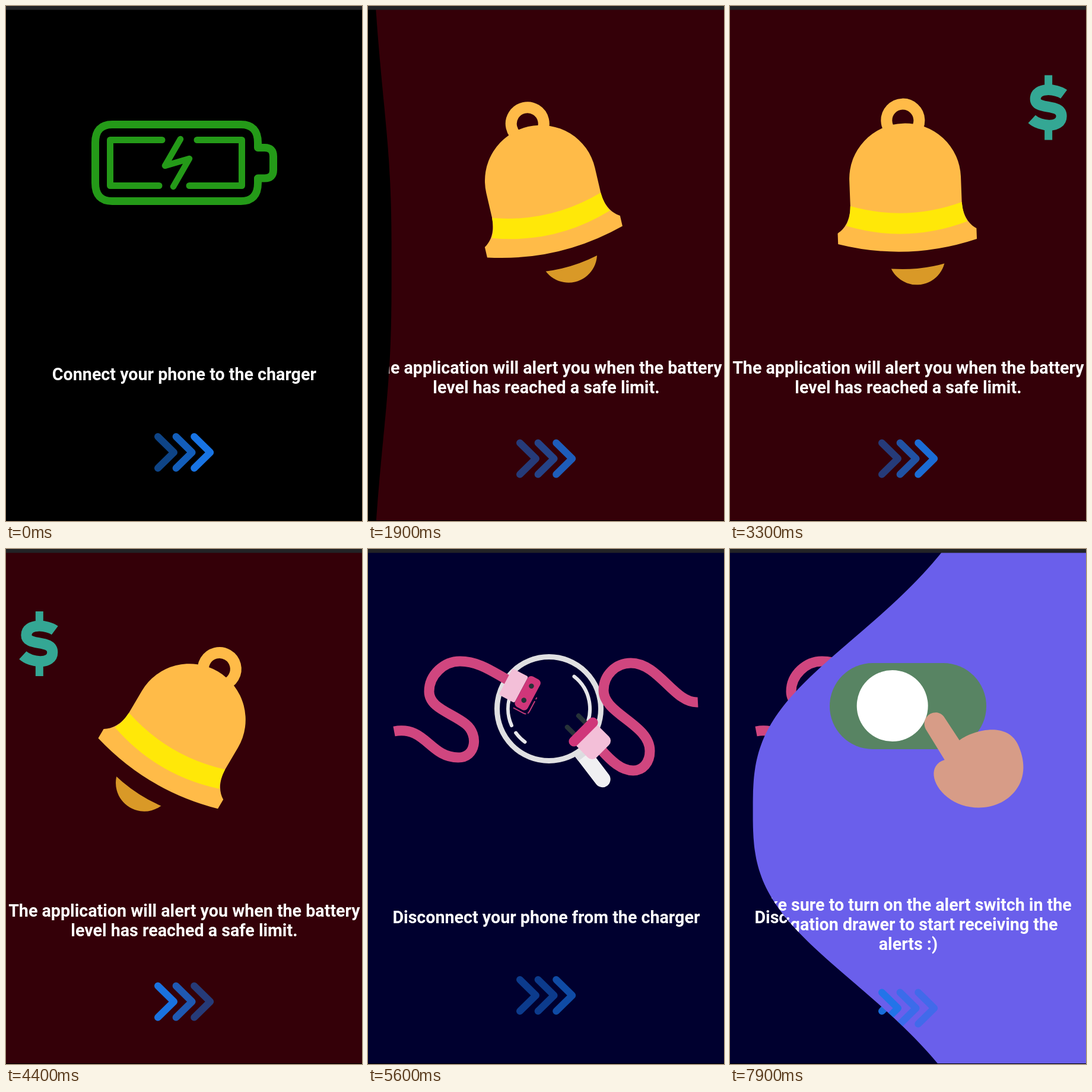
Write an HTML page that moves like this. It is 600x867 px and loops after 8 s.

```html
<!DOCTYPE html>
<html lang="en">
<head>
<meta charset="utf-8">
<title>Battery alert onboarding</title>
<style>
html, body { margin: 0; width: 100%; height: 100%; overflow: hidden; background: #000; }
svg { display: block; width: 600px; height: 867px; }
text { font: 700 28.65px Roboto, "Liberation Sans", sans-serif; fill: #fff; text-anchor: middle; }
.line { fill: none; stroke-linecap: round; stroke-linejoin: round; }
</style>
</head>
<body>
<svg viewBox="0 0 600 867">
  <defs>
    <clipPath id="wave"><path id="wavePath"/></clipPath>
    <clipPath id="belowBell"><path d="M-203 60Q-13.5 197 176 60V240H-203Z"/></clipPath>
  </defs>

  <g class="page" data-chevron="751.5">
    <rect width="600" height="867"/>
    <g class="line" stroke="#249a18">
      <path stroke-width="13" d="M424.5 238.5V230Q424.5 199.5 396 199.5H179Q150.5 199.5 150.5 230V298Q150.5 328.5 179 328.5H396Q424.5 328.5 424.5 298V290H436Q450.5 290 450.5 276V253Q450.5 238.5 436 238.5Z" />
      <path stroke="#000" stroke-width="15" stroke-linecap="butt" d="M424.5 246V282"/>
      <path stroke-width="11" d="M263 225.5H175.5V302.5H258M322 225.5H397.5V302.5H309"/>
      <path stroke-width="10.5" d="M294 224L268 269L309 257L282 304"/>
    </g>
    <text y="630" x="300.4">Connect your phone to the charger</text>
  </g>

  <g class="page" data-chevron="762">
    <rect width="600" height="867" fill="#340008"/>
    <g id="dollar" fill="none" stroke="#34a794">
      <path stroke-width="18" d="M27 -22C15 -31 -21 -35 -21 -14C-21 6 23 -8 23 15C23 36 -13 33 -27 20"/>
      <path stroke-width="13" d="M1 -54V-34M1 34V55"/>
    </g>
    <g id="bell">
      <g clip-path="url(#belowBell)"><circle id="clapper" cy="107.5" r="48" fill="#d99927"/></g>
      <g transform="translate(-13.5)" fill="#ffbb48">
        <circle cy="-122" r="27.5" fill="none" stroke="#ffbb48" stroke-width="19"/>
        <path d="M-94 -24A94 93 0 0 1 94 -24V19C95 43 105 57 117 64V82Q0 116 -117 82V64C-105 57 -95 43 -94 19Z"/>
        <path fill="#ffe808" d="M-94 19Q0 49 94 19Q95 40 102 52Q0 86 -102 52Q-95 40 -94 19Z"/>
      </g>
    </g>
    <text y="619" x="300.4">The application will alert you when the battery</text>
    <text y="652" x="300.4">level has reached a safe limit.</text>
  </g>

  <g class="page" data-chevron="751.5">
    <rect width="600" height="867" fill="#00002f"/>
    <g id="lens">
      <g id="handle">
        <path d="M90 -13H149A13.5 13.5 0 0 1 149 14H90Z" fill="#f0f0f2"/>
        <path d="M90 -13H100V14H90Z" fill="#dcdce0"/>
      </g>
      <circle r="87.5" fill="none" stroke="#e0e0e2" stroke-width="9"/>
      <g id="glints" class="line" stroke="#e6e6ea" stroke-width="6"></g>
    </g>
    <g class="line" stroke="#d0467f" stroke-width="17" style="stroke-linecap:butt">
      <path d="M44 307C97 297 104 351 152 351C182 351 187 313 165 295C142 276 103 268 103 240C103 212 128 189 155 189C188 189 212 208 240 223"/>
      <path id="rightCord"/>
    </g>
    <g id="socket">
      <rect id="socketBody" y="-25" height="50" rx="3" fill="#f3bfd8"/>
      <rect id="socketHead" y="-29" height="58" rx="7" fill="#d0367a"/>
      <circle class="hole" cy="-13.5" r="4.3" fill="#263238"/>
      <circle class="hole" cy="13.5" r="4.3" fill="#263238"/>
      <path id="socketEdge" class="line" stroke="#c03a78" stroke-width="2" stroke-dasharray="22 5"/>
    </g>
    <g id="plug">
      <path class="line" stroke="#263238" stroke-width="8" d="M-13.5 0V-25M13.5 0V-25"/>
      <rect x="-25" y="0" width="50" height="46" rx="10" fill="#f3bfd8"/>
      <rect x="-31" y="-8.5" width="62" height="17" rx="8" fill="#d0367a"/>
    </g>
    <text y="630" x="300.4">Disconnect your phone from the charger</text>
  </g>

  <g class="page" data-chevron="773">
    <rect width="600" height="867" fill="#6a5feb"/>
    <rect x="168" y="192" width="264" height="145" rx="72.5" fill="#588463"/>
    <g id="toggle">
      <circle cx="274" cy="264" r="60" fill="#fff"/>
      <path fill="#d79c87" d="M330 303C320 280 350 265 362 284L387 322C410 305 466 290 485 328C498 355 499 384 482 406C454 443 398 443 367 418C339 396 335 363 362 355Z"/>
    </g>
    <text y="609" x="300.4">Make sure to turn on the alert switch in the</text>
    <text y="642" x="300.4">navigation drawer to start receiving the</text>
    <text y="675" x="300.4">alerts :)</text>
  </g>

  <rect width="600" height="6.5" fill="#232326"/>
  <rect y="866" width="600" height="1"/>
</svg>
<script>
const LOOP = 8000, SWIPE = 1000, CHEVRON_PERIOD = 1500, SWING_PERIOD = 1488;
const swipeStarts = [null, 965, 4550, 7500];
const chevronPhases = [0.33, 0.187, 0.803, 0.783];
const $ = id => document.getElementById(id);
const set = (el, attrs) => { for (const k in attrs) el.setAttribute(k, attrs[k]); };
const make = (parent, name, attrs) => {
  const el = document.createElementNS("http://www.w3.org/2000/svg", name);
  set(el, attrs);
  return parent.appendChild(el);
};
const clamp = v => Math.min(1, Math.max(0, v));
const mix = (a, b, u) => a + (b - a) * u;
const rad = deg => deg * Math.PI / 180;

const pages = [...document.querySelectorAll(".page")];
const chevrons = pages.map(page => [0, 1, 2].map(i => make(page, "path", {
  class: "line", stroke: "#1977ea", "stroke-width": 12,
  d: `M${256 + i * 30.6} ${page.dataset.chevron - 26.5}l27 26.5l-27 26.5`
})));

const glintPoint = deg => `${69 * Math.cos(rad(deg))} ${69 * Math.sin(rad(deg))}`;
for (const [from, to] of [[-52, 37], [156, 203], [126, 144]])
  make($("glints"), "path", { d: `M${glintPoint(from)}A69 69 0 0 1 ${glintPoint(to)}` });

// Right-hand region whose left edge bulges, overshoots and settles.
function wavePath(p) {
  const grow = clamp(p / 0.4), settle = (p - 0.4) / 0.6;
  const side = p < 0.4 ? 57 * grow : mix(57, 602, clamp(settle / 0.8));
  const bulge = p < 0.4 ? 505 * grow
    : 505 * Math.exp(-2.04 * settle) * Math.cos(4.676 * settle);
  const reach = 0.465 * mix(82, 780, grow);
  let d = "M1200 0";
  for (let y = 0; y <= 870; y += 6) {
    const depth = 1 / (1 + (Math.abs(y - 440) / reach) ** 3);
    d += `L${(600 - side - bulge * depth).toFixed(1)} ${y}`;
  }
  return d + "L1200 870Z";
}

function drawPages(t) {
  pages.forEach((page, i) => {
    const p = i ? (t - swipeStarts[i]) / SWIPE : 1;
    page.style.display = p > 0 ? "" : "none";
    if (p > 0 && p < 1) {
      set($("wavePath"), { d: wavePath(p) });
      set(page, { "clip-path": "url(#wave)" });
    } else page.removeAttribute("clip-path");

    // Each arrow lights up quickly and fades a little slower.
    const phase = (t / CHEVRON_PERIOD + chevronPhases[i]) % 1;
    chevrons[i].forEach((el, k) => {
      const gap = phase - 0.1 - 0.12 * k;
      const glow = clamp(gap < 0 ? 1 + gap / 0.2 : 1 - gap / 0.27);
      set(el, { "stroke-opacity": 0.5 + 0.5 * glow });
    });
  });
}

function drawBell(t) {
  const a = 2 * Math.PI * (t - 4400) / SWING_PERIOD;
  set($("bell"), { transform: `translate(309.5 314) rotate(${30.5 * Math.cos(a)})` });
  set($("clapper"), { cx: -13.5 - 12 * Math.cos(a) + 14 * Math.sin(a) });

  const since = t - 2950, flight = Math.floor(since / 1100);
  const k = (since - flight * 1100) / 350;
  const x = flight % 2 ? 300 - 244 * k : 300 + 235 * k;
  const y = (flight % 2 ? 159.5 : 171) + 200 * (1 - k);
  $("dollar").style.display = since >= 0 && k < 1.5 ? "" : "none";
  set($("dollar"), { transform: `translate(${x} ${y})` });
}

function drawPlug(t) {
  const u = 0.5 - 0.5 * Math.cos(Math.PI * (t - 5600) / 1100);
  set($("lens"), { transform: `translate(${mix(305, 312, u)} ${mix(269, 266, u)})` });
  set($("handle"), { transform: `rotate(${mix(52.6, 85.8, u)})` });
  set($("glints"), { transform: `rotate(${-41 * u})` });

  const body = mix(30, 38, u), head = mix(24, 16, u), end = body + head;
  set($("socket"), { transform: `translate(${mix(232, 240, u)} ${mix(223, 226, u)}) rotate(28)` });
  set($("socketBody"), { width: body });
  set($("socketHead"), { x: body, width: head });
  document.querySelectorAll(".hole").forEach(el => set(el, { cx: body + head / 2 }));
  set($("socketEdge"), { d: `M${body + 3} 33H${end - 2}Q${end + 5} 33 ${end + 5} 25V0` });

  const px = mix(363, 358, u), py = mix(308, 301, u);
  const right = mix(475, 468, u), low = mix(373, 362, u), bottom = mix(447, 432, u);
  set($("plug"), { transform: `translate(${px} ${py}) rotate(-45)` });
  set($("rightCord"), {
    d: `M556 258C516 260 490 192 443 192C418 192 397 212 397 238C397 278 ${right} 295 ${right} 340` +
       `C${right} 360 ${bottom + 16} ${low} ${bottom} ${low}C${bottom - 20} ${low} ${px + 47} ${py + 49} ${px + 30} ${py + 30}`
  });
}

function drawToggle(t) {
  set($("toggle"), { transform: `translate(${mix(-34, 8, clamp((t - 7500) / 500))})` });
}

function draw(t) {
  drawPages(t);
  drawBell(t);
  drawPlug(t);
  drawToggle(t);
}

const start = performance.now();
function tick() {
  draw((performance.now() - start) % LOOP);
  requestAnimationFrame(tick);
}
tick();
</script>
</body>
</html>
```
